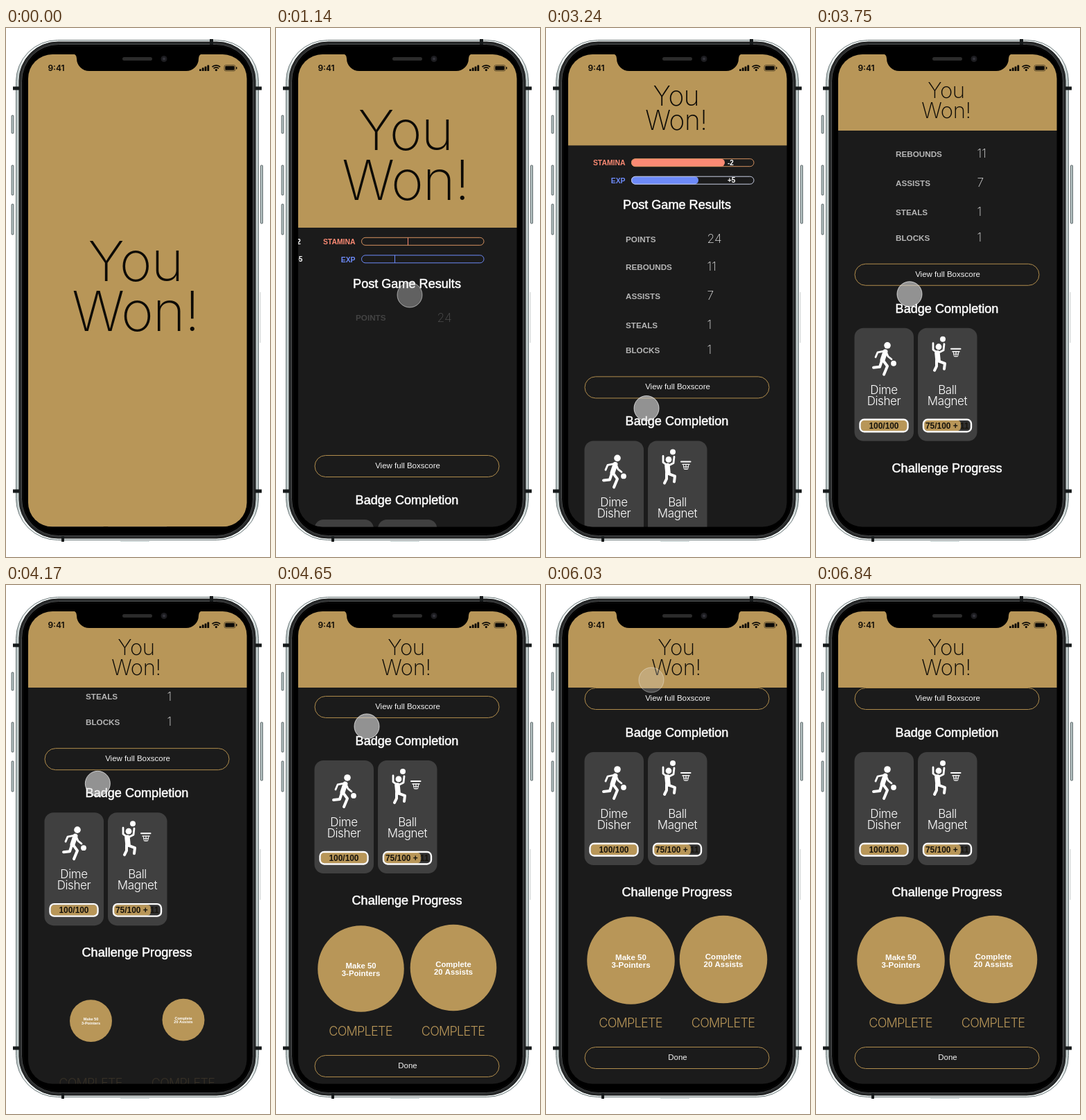
Recreate the animation shown at these times as an HTML page with a canvas. Size 381x763 px, loop 6870 ms.

```html
<!DOCTYPE html>
<html lang="en">
<head>
<meta charset="utf-8">
<title>Post game results</title>
<style>
html, body { margin: 0; width: 100%; height: 100%; overflow: hidden; background: #fff; }
canvas { display: block; width: 381px; height: 763px; }
</style>
</head>
<body>
<canvas id="stage" width="381" height="763"></canvas>
<script>
const ctx = document.getElementById('stage').getContext('2d');
const LOOP = 6870;
const GOLD = '#b89658', DARK = '#1b1b1b', INK = '#0c0a06';
const SANS = '"Liberation Sans", Arial, sans-serif';
const LIGHT = 'Inter, Roboto, sans-serif';

const clamp = v => Math.max(0, Math.min(1, v));
const mix = (a, b, p) => a + (b - a) * p;
const span = (t, start, length) => clamp((t - start) / length);
const easeOut = (p, power = 3) => 1 - (1 - p) ** power;
const easeInOut = p => p * p * (3 - 2 * p);

// Monotone cubic through [time, value] keys.
function track(keys, t) {
  const last = keys.length - 1;
  if (t <= keys[0][0]) return keys[0][1];
  if (t >= keys[last][0]) return keys[last][1];
  const slope = i => (keys[i + 1][1] - keys[i][1]) / (keys[i + 1][0] - keys[i][0]);
  const tangent = i => {
    if (i === 0 || i === last) return 0;
    const a = slope(i - 1), b = slope(i);
    return a * b > 0 ? 2 * a * b / (a + b) : 0;
  };
  const i = keys.findIndex(k => k[0] > t) - 1;
  const h = keys[i + 1][0] - keys[i][0], u = (t - keys[i][0]) / h;
  return mix(keys[i][1], keys[i + 1][1], u * u * (3 - 2 * u))
    + h * u * (1 - u) * (tangent(i) * (1 - u) - tangent(i + 1) * u);
}

function box(x, y, w, h, r, fill, stroke, width = 1) {
  ctx.beginPath();
  ctx.roundRect(x, y, w, h, r);
  if (fill) { ctx.fillStyle = fill; ctx.fill(); }
  if (stroke) { ctx.strokeStyle = stroke; ctx.lineWidth = width; ctx.stroke(); }
}

function dot(x, y, r, fill) {
  ctx.beginPath();
  ctx.arc(x, y, Math.max(0, r), 0, Math.PI * 2);
  ctx.fillStyle = fill;
  ctx.fill();
}

function line(points, color, width) {
  ctx.beginPath();
  points.forEach(([x, y], i) => i ? ctx.lineTo(x, y) : ctx.moveTo(x, y));
  ctx.strokeStyle = color;
  ctx.lineWidth = width;
  ctx.stroke();
}

function text(str, x, y, size, color, { weight = 400, font = SANS, align = 'center', gap = 0, bolden = 0 } = {}) {
  ctx.font = `${weight} ${size}px ${font}`;
  ctx.textAlign = align;
  ctx.letterSpacing = gap + 'px';
  ctx.fillStyle = color;
  ctx.fillText(str, x, y);
  if (bolden) {
    ctx.strokeStyle = color;
    ctx.lineWidth = bolden;
    ctx.strokeText(str, x, y);
  }
  ctx.letterSpacing = '0px';
}

const title = (str, y) => text(str, 189, y, 18.1, '#fff', { bolden: 0.5 });

function button(label, y) {
  box(56, y, 266, 31, 15.5, null, '#b08c4c');
  text(label, 190, y + 18.5, 11.5, '#f4f4f4');
}

function drawBody() {
  ctx.fillStyle = '#fff';
  ctx.fillRect(0, 0, 381, 763);
  const edge = '#3d4a4c';
  [[126, 26], [198, 43], [254, 44]].forEach(([y, h]) => box(8, y, 3, h, 1, '#b9c6c6', edge, 0.8));
  box(367.5, 198, 3, 84, 1, '#b9c6c6', edge, 0.8);
  line([[367, 381], [367, 454]], '#c9cccc', 1);
  line([[165, 740.5], [207, 740.5]], '#b9c6c6', 1);

  const steel = ctx.createLinearGradient(14, 0, 365, 0);
  steel.addColorStop(0, '#aebbbb');
  steel.addColorStop(0.03, '#eef3f3');
  steel.addColorStop(0.97, '#eef3f3');
  steel.addColorStop(1, '#aebbbb');
  box(14.5, 17.5, 350, 721, 60, steel, '#6f7b7c', 1);
  box(19, 20, 341, 716, 56, '#2a2c2d', '#111', 1);
  box(22.5, 23.5, 334, 709, 53, '#050505', '#4a4c4d', 1);
  box(26, 27, 327, 702, 49, '#000');

  ctx.fillStyle = '#161a1b';
  [87, 668].forEach(y => {
    ctx.fillRect(10, y - 2.5, 10, 5);
    ctx.fillRect(360, y - 2.5, 9, 5);
  });
  ctx.fillRect(294, 16, 5, 8);
  ctx.fillRect(80, 733, 4, 8);
}

function drawNotch() {
  ctx.beginPath();
  ctx.moveTo(96, 37);
  ctx.quadraticCurveTo(102, 38, 102, 44);
  ctx.arcTo(102, 62, 120, 62, 18);
  ctx.arcTo(278, 62, 278, 44, 18);
  ctx.lineTo(278, 44);
  ctx.quadraticCurveTo(278, 38, 284, 37);
  ctx.fillStyle = '#000';
  ctx.fill();
  box(168, 42, 43, 5, 2.5, '#2b2b2b');
  dot(228, 44.5, 4.5, '#1c1c20');
  dot(228, 44.5, 2, '#34343c');
}

function drawStatus() {
  text('9:41', 72.5, 62, 12, INK, { weight: 600, font: LIGHT });
  for (let i = 0; i < 4; i++) box(279 + i * 3.8, 59.2 - i * 1.9, 2.8, 2.8 + i * 1.9, 0.6, INK);
  ctx.strokeStyle = INK;
  ctx.lineWidth = 1.7;
  [8.2, 5.2].forEach(r => {
    ctx.beginPath();
    ctx.arc(303.3, 62, r, -Math.PI * 0.75, -Math.PI * 0.25);
    ctx.stroke();
  });
  dot(303.3, 60.6, 1.6, INK);
  box(315, 53.5, 16, 8.5, 2.4, null, 'rgba(12,10,6,.5)', 1);
  box(316.3, 54.8, 13.4, 5.9, 1.3, INK);
  box(332, 56, 1.4, 3.5, 0.7, INK);
}

function meter(name, y, color, rim, fillWidth, label, p) {
  text(name, 114.5, y + 10, 10.4, color, { weight: 700, align: 'right' });
  const w = Math.max(1, fillWidth * p);
  box(123 + (fillWidth - w) / 2, y, w, 11.5, Math.min(5.7, w / 2), color);
  box(123.5, y + 0.3, 176.5, 11, 5.5, null, rim);
  text(label, 262 - 235 * (1 - p), y + 9.5, 10, '#fff', { weight: 700, align: 'left' });
}

function drawStats(t) {
  const p = easeInOut(span(t, 1140, 700));
  meter('STAMINA', 302, '#fb8a74', '#d6925f', 135, '-2', p);
  meter('EXP', 327.5, '#6d8af8', p > 0.5 ? '#c9cfe4' : '#6d8af8', 97, '+5', p);
  title('Post Game Results', 375);
  const rows = [['POINTS', 24, 418], ['REBOUNDS', 11, 458], ['ASSISTS', 7, 500], ['STEALS', 1, 542], ['BLOCKS', 1, 578.5]];
  rows.forEach(([name, value, y], i) => {
    ctx.globalAlpha = easeOut(span(t, 1090 + i * 360, 360), 2);
    text(name, 115, y + 4.3, 11.7, '#b6b6b6', { weight: 700, align: 'left' });
    text(value, 232.5, y + 5.5, 17.5, '#dcdcdc', { weight: 200, font: LIGHT, align: 'left' });
  });
  ctx.globalAlpha = 1;
  button('View full Boxscore', 616.5);
}

function drawDribbler() {
  dot(103, 734, 4.8, '#fff');
  dot(112, 760, 3.9, '#fff');
  line([[100, 743], [96, 755]], '#fff', 7);
  line([[99, 742], [89, 744], [86, 751]], '#fff', 2.8);
  line([[101, 743], [104, 750], [109, 754]], '#fff', 2.8);
  line([[97, 756], [103, 764], [98, 776]], '#fff', 4);
  line([[95, 756], [92, 765], [83, 766]], '#fff', 4);
}

function drawShooter() {
  dot(183, 725, 4, '#fff');
  dot(177, 736, 4.4, '#fff');
  line([[175, 745], [176, 755]], '#fff', 7.5);
  line([[173, 743], [169, 740], [169, 731]], '#fff', 2.8);
  line([[178, 744], [184, 741], [185, 732]], '#fff', 2.8);
  line([[178, 757], [186, 760], [185, 768]], '#fff', 4);
  line([[174, 756], [174, 764], [171, 770]], '#fff', 4);
  line([[195, 739], [208.5, 739]], '#fff', 2);
  line([[197, 743], [207, 743]], '#fff', 1.4);
  line([[198, 743], [199.5, 750], [204.5, 750], [206, 743]], '#fff', 1);
  line([[202, 743], [202, 750]], '#fff', 1);
  line([[198.5, 746.5], [205.5, 746.5]], '#fff', 1);
}

function badge(x, words, label, labelX, amount) {
  box(x, 709, 85.5, 163, 13, '#404040');
  words.forEach((word, i) => text(word, x + 42.5, 804 + i * 16, 17, '#fff', { weight: 300, font: LIGHT, gap: -0.4 }));
  box(x + 8, 841, 69, 17.5, 6, '#303030');
  box(x + 9, 842, 67 * amount, 15.5, 5, GOLD);
  box(x + 8, 841, 69, 17.5, 6, null, '#fff', 2.4);
  text(label, labelX, 854, 11.9, '#16130c', { weight: 700, align: 'left' });
}

function drawBadges() {
  title('Badge Completion', 687);
  badge(55.5, ['Dime', 'Disher'], '100/100', 76.5, 1);
  badge(147, ['Ball', 'Magnet'], '75/100 + 11', 158, 0.79);
  ctx.lineCap = ctx.lineJoin = 'round';
  drawDribbler();
  drawShooter();
  ctx.lineCap = 'butt';
  ctx.lineJoin = 'miter';
}

function challenge(x, y, lines, t) {
  const size = easeOut(span(t, 4000, 870));
  if (!size) return;
  ctx.save();
  ctx.translate(x, y);
  ctx.scale(size, size);
  dot(0, 0, 63.3, GOLD);
  lines.forEach((str, i) => text(str, 0, i * 11 - 0.5, 11.5, '#fff', { weight: 700 }));
  ctx.restore();
  ctx.globalAlpha = span(t, 4100, 400);
  text('COMPLETE', x - 0.5, 1106, 18, GOLD, { weight: 300, font: LIGHT, gap: -0.75 });
  ctx.globalAlpha = 1;
}

function drawChallenges(t) {
  title('Challenge Progress', 917);
  challenge(122.5, 1009.5, ['Make 50', '3-Pointers'], t);
  challenge(256, 1008, ['Complete', '20 Assists'], t);
  button('Done', 1134.5);
}

function drawHeader(t, scroll) {
  const rise = easeOut(span(t, 700, 430));
  const settle = 5 * easeInOut(span(t, 1140, 400));
  const shrink = clamp(scroll / 135);
  const bottom = mix(mix(719, 288, rise) - settle, 148, shrink);
  const base = mix(mix(437, 248, rise) - settle, 129.5, shrink);
  const size = mix(1, 0.39, shrink);
  ctx.fillStyle = GOLD;
  ctx.fillRect(32, 38, 316, bottom - 38);
  ctx.save();
  ctx.translate(mix(187, 188, shrink), base);
  ctx.scale(size, size);
  const style = { weight: 200, font: LIGHT, gap: -1 };
  text('You', 0, -72, 80, INK, style);
  text('Won!', 0, 0, 80, INK, style);
  ctx.restore();
}

function drawTouch(t) {
  const second = t > 1800;
  const alpha = second
    ? track([[2450, 0], [2610, 0.32], [2760, 0.6], [5880, 0.6], [6030, 0.25], [6180, 0]], t)
    : track([[300, 0], [520, 0.45], [700, 0.6], [1140, 0.35], [1320, 0]], t);
  if (alpha <= 0) return;
  const x = second ? track([[2700, 154], [3750, 135], [4650, 131], [5600, 152]], t) : 193;
  const y = second ? track([[2700, 664], [3750, 384], [4650, 204], [5600, 137]], t) : 385;
  dot(x, y, 18, `rgba(225,225,225,${alpha})`);
  ctx.strokeStyle = `rgba(255,255,255,${Math.min(0.7, alpha * 1.5)})`;
  ctx.lineWidth = 1;
  ctx.stroke();
}

function draw(t) {
  const scroll = track([[2700, 0], [3750, 276], [4650, 456], [5300, 468]], t);
  drawBody();
  ctx.save();
  ctx.beginPath();
  ctx.roundRect(32, 38, 315.5, 681.5, 35);
  ctx.clip();
  ctx.fillStyle = DARK;
  ctx.fillRect(32, 38, 316, 682);
  ctx.save();
  ctx.translate(0, -scroll);
  drawStats(t);
  drawBadges();
  drawChallenges(t);
  ctx.restore();
  drawHeader(t, scroll);
  drawStatus();
  drawTouch(t);
  ctx.restore();
  drawNotch();
}

const start = performance.now();
function tick() {
  draw((performance.now() - start) % LOOP);
  requestAnimationFrame(tick);
}
tick();
</script>
</body>
</html>
```
